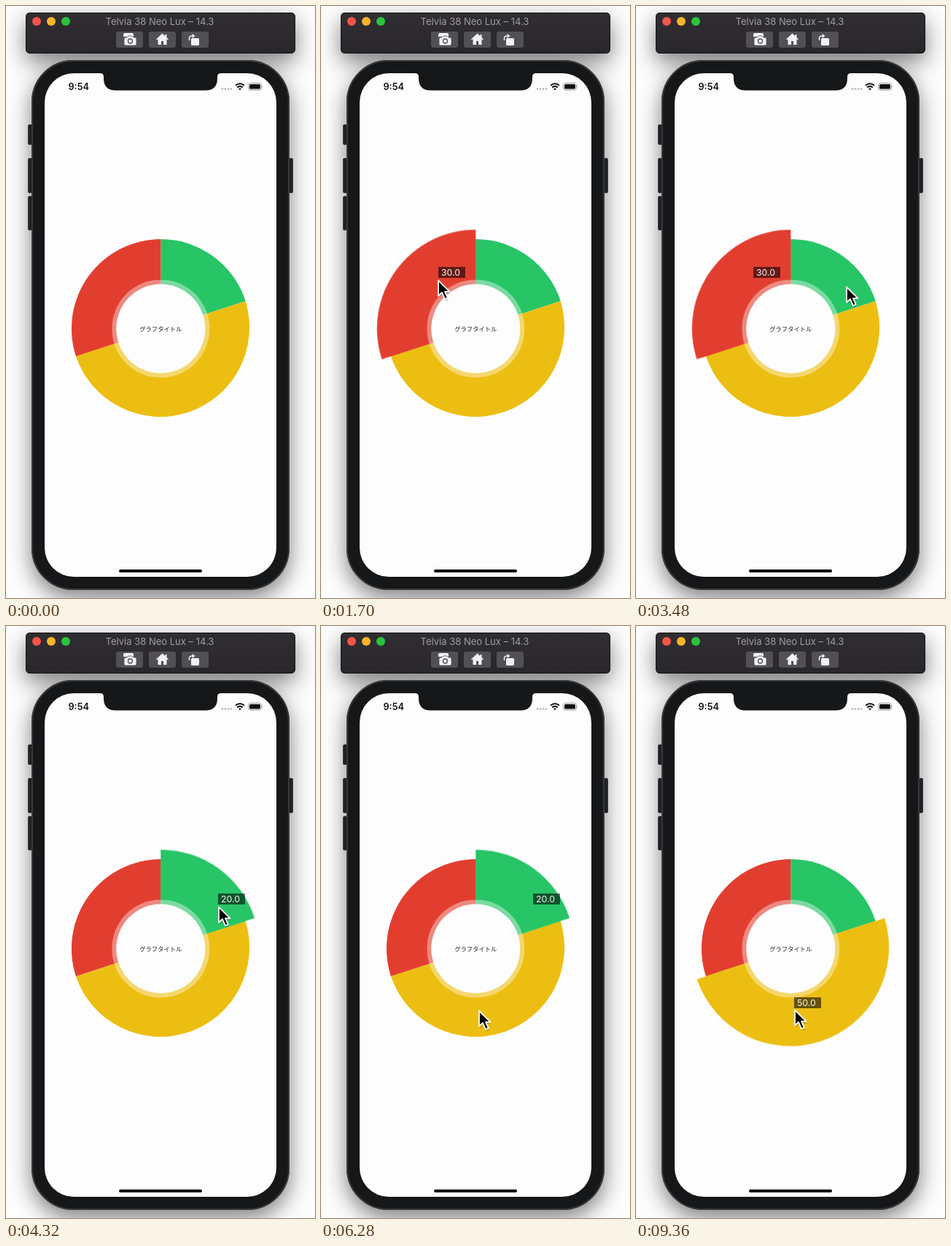
Write an HTML page that moves like this. It is 424 by 810 pixels and loops after 9.46 s.

```html
<!DOCTYPE html>
<html lang="ja">
<head>
<meta charset="utf-8">
<title>Donut chart</title>
<style>
  html, body { margin: 0; width: 100%; height: 100%; overflow: hidden; background: #fdfdfd; }
  .stage { position: relative; width: 424px; height: 810px; overflow: hidden; }
  .stage > * { position: absolute; box-sizing: border-box; }
  .shadow { box-shadow: 0 11px 30px rgba(0, 0, 0, .5); }
  .bar { left: 27px; top: 9px; width: 370px; height: 56px; border-radius: 5px;
    border: 1px solid #111; background: linear-gradient(#302e32, #29272b); }
  .side { width: 6px; background: #202126; border: 1px solid #34353a; border-radius: 2px; }
  .phone { left: 35px; top: 74px; width: 354px; height: 725px; border-radius: 57px;
    border: 2px solid #36383a; background: #151719; }
  .screen { left: 53px; top: 92px; width: 318px; height: 689px; border-radius: 40px; background: #fdfdfd; }
  svg { left: 0; top: 0; display: block; }
  text { font-family: Inter, Roboto, sans-serif; }
  .jp { font-family: "Noto Sans CJK JP", "Noto Sans CJK", sans-serif; }

  .pick { opacity: 0; animation: 9460ms step-end infinite; }
  .p1 { animation-name: first; }
  .p2 { animation-name: second; }
  .p3 { animation-name: third; }
  @keyframes first  { 0% { opacity: 0 } 15% { opacity: 1 } 40.2%, 100% { opacity: 0 } }
  @keyframes second { 0% { opacity: 0 } 40.2% { opacity: 1 } 68.7%, 100% { opacity: 0 } }
  @keyframes third  { 0% { opacity: 0 } 68.7%, 100% { opacity: 1 } }

  .cursor { animation: travel 9460ms ease-in-out infinite; }
  @keyframes travel {
    0%, 7% { transform: translate(-30px, 430px) }
    13.7%, 27.5% { transform: translate(160px, 374px) }
    35.9%, 37.2% { transform: translate(288px, 383px) }
    39%, 50.7% { transform: translate(291px, 383px); animation-timing-function: ease-in }
    54.97% { transform: translate(258px, 470px); animation-timing-function: ease-out }
    61.3%, 66.6% { transform: translate(216px, 525px) }
    67.8%, 100% { transform: translate(217px, 524px) }
  }
</style>
</head>
<body>
<div class="stage">
  <div class="phone shadow"></div>
  <div class="bar shadow"></div>
  <div class="side" style="left:30px;top:162px;height:28px"></div>
  <div class="side" style="left:30px;top:208px;height:48px"></div>
  <div class="side" style="left:30px;top:260px;height:47px"></div>
  <div class="side" style="left:388px;top:208px;height:48px"></div>
  <div class="phone"></div>
  <div class="screen"></div>

  <svg width="424" height="810" viewBox="0 0 424 810">
    <defs>
      <path id="green" fill="#27c566" d="M0 0V-122.4A122.4 122.4 0 0 1 116.400 -37.800Z"/>
      <path id="yellow" fill="#edbe12" d="M0 0L116.400 -37.800A122.4 122.4 0 0 1 -116.400 37.800Z"/>
      <path id="red" fill="#e23e30" d="M0 0L-116.400 37.800A122.4 122.4 0 0 1 0 -122.4Z"/>
      <rect id="key" width="37" height="22" rx="3" fill="#525054"/>
      <rect id="tag" width="37" height="15" fill="#000" opacity=".57"/>
    </defs>

    <!-- window bar -->
    <circle cx="42" cy="21" r="6" fill="#f5544a"/>
    <circle cx="62" cy="21" r="6" fill="#f6b52a"/>
    <circle cx="82" cy="21" r="6" fill="#2bc33e"/>
    <text x="211" y="26" font-size="13" text-anchor="middle" fill="#9f9ca3">Telvia 38 Neo Lux – 14.3</text>
    <use href="#key" x="151" y="35"/>
    <use href="#key" x="196" y="35"/>
    <use href="#key" x="241" y="35"/>
    <g fill="#f2f1f3">
      <path d="M161 39q0-2 2-2h10q2 0 2 2v3h-14z"/>
      <path d="M164 43h2l2-2h5l2 2h2q2 0 2 2v7q0 2-2 2h-13q-2 0-2-2v-7q0-2 2-2z" stroke="#525054" stroke-width=".8"/>
      <circle cx="170.500" cy="48" r="3" fill="none" stroke="#525054" stroke-width="1.300"/>
      <path d="M214.500 37.500L206 45.500l1 1 1.500-1.300V53h4.500v-5h3v5h4.500v-7.800l1.500 1.300 1-1-2.500-2.400V39h-2v2.200z"/>
      <rect x="254" y="44" width="11" height="10" rx="1.500"/>
      <path d="M255.500 38l4 3-4 3z"/>
      <path d="M251.500 47v-3q0-3 4-3" fill="none" stroke="#f2f1f3" stroke-width="1.500"/>
    </g>

    <!-- notch, status and home bar -->
    <path d="M129 91V92Q134 92 134 97V99Q134 115.500 150.500 115.500H273.500Q290 115.500 290 99V97Q290 92 295 92V91Z" fill="#151719"/>
    <text x="85.500" y="115" font-size="12.700" font-weight="600" fill="#111">9:54</text>
    <g fill="#bcbcbc">
      <circle cx="297" cy="113.500" r="1.400"/><circle cx="301" cy="113.500" r="1.400"/>
      <circle cx="305" cy="113.500" r="1.400"/><circle cx="309" cy="113.500" r="1.400"/>
    </g>
    <g fill="none" stroke="#111" stroke-width="2">
      <path d="M315 108.700q6-5 12 0"/>
      <path d="M317.200 111.400q3.800-3 7.600 0"/>
    </g>
    <path d="M319 113.200q2-1.500 4 0l-2 2z" fill="#111"/>
    <rect x="332.500" y="105.500" width="18" height="9.500" rx="2.800" fill="none" stroke="#9a9a9a"/>
    <rect x="334" y="107" width="15" height="6.500" rx="1.500" fill="#111"/>
    <path d="M351.500 108.500q1.500 1.700 0 3.400z" fill="#9a9a9a"/>
    <rect x="155" y="771" width="114" height="4" rx="2" fill="#000"/>

    <!-- chart -->
    <g transform="translate(212.300 441.500)">
      <use href="#green"/><use href="#yellow"/><use href="#red"/>
      <use class="pick p1" href="#red" transform="scale(1.107)"/>
      <use class="pick p2" href="#green" transform="scale(1.107)"/>
      <use class="pick p3" href="#yellow" transform="scale(1.107)"/>
      <circle r="67" fill="#fff" opacity=".39"/>
      <circle r="61" fill="#fdfdfd"/>
      <text class="jp" y="3" font-size="8.300" text-anchor="middle" fill="#222">グラフタイトル</text>
    </g>

    <!-- value tags -->
    <g font-size="12.300" fill="#f5f2f2">
      <g class="pick p1"><use href="#tag" x="161" y="357"/><text x="165" y="369">30.0</text></g>
      <g class="pick p2"><use href="#tag" x="291" y="366"/><text x="295" y="378">20.0</text></g>
      <g class="pick p3"><use href="#tag" x="217" y="508"/><text x="221" y="520">50.0</text></g>
    </g>

    <g class="cursor">
      <path d="M2 4V26L7 21.500L11 30L15 28L11.500 20H18Z" fill="#444" opacity=".22"/>
      <path d="M1 1.500V22.500L6 18L10 27L13.700 25.300L10 16.800H16.500Z" fill="#050505" stroke="#fdfdfd" stroke-width="1.800" stroke-linejoin="round"/>
    </g>
  </svg>
</div>
</body>
</html>
```
